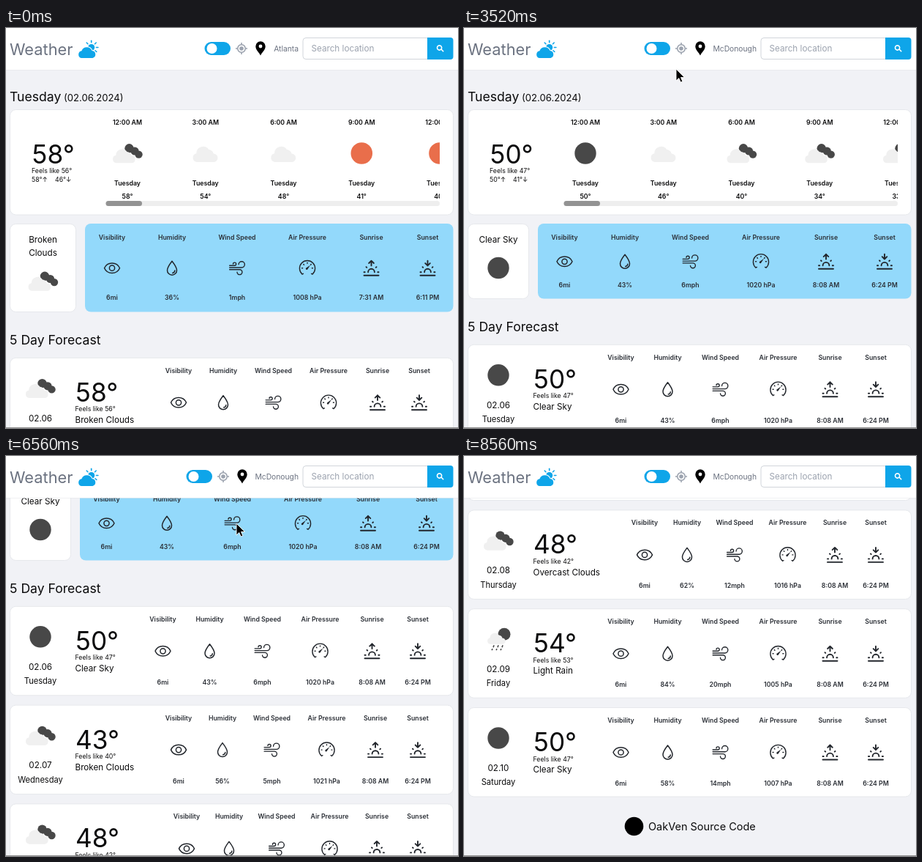
An HTML page for the animation above (8640 ms loop, 618 px wide and 546 px high).

```html
<!DOCTYPE html>
<html lang="en">
<head>
<meta charset="utf-8">
<title>Weather</title>
<style>
html, body { margin: 0; width: 100%; height: 100%; overflow: hidden; }
svg { display: block; font-family: Inter, sans-serif; }
svg {
  --bg: #f1f2f6; --head: #fff; --edge: #e6e8ec; --title: #6b7280; --ink: #0b0b0c;
  --card: #fff; --blue: #93d9fb; --brand: #0ea5e9; --button: #0ea5e9; --toggle: #0ea5e9;
  --pin: #000; --locate: #9ca3af; --city: #6b7280; --field: #fff; --fieldEdge: #d1d5db;
  --hint: #9ca3af; --track: #eeeeee; --thumb: #939393; --cloud: #f0f0f0;
}
svg.dark {
  --bg: #475569; --head: #263143; --edge: #263143; --title: #fff; --ink: #fff;
  --card: #9ca3af; --blue: #73b9dc; --button: #0284c7; --toggle: #1b232f;
  --pin: #fff; --locate: #cbd5e1; --city: #fff; --field: #9ca3af; --fieldEdge: #9ca3af;
  --hint: #6b7280; --track: #cdcdcd; --thumb: #4a4a4a; --cloud: #f4f4f4;
}
.line { fill: none; stroke: #22262c; stroke-linecap: round; stroke-linejoin: round; }
</style>
</head>
<body>
<svg id="stage" width="618" height="546" viewBox="0 0 618 546">
  <defs><clipPath id="hours"><rect x="130" y="112" width="463" height="143"/></clipPath></defs>
  <rect width="618" height="546" style="fill:var(--bg)"/>
  <g id="page"></g>
  <g id="header"></g>
  <rect y="545" width="618" height="1" fill="#929292"/>
  <g id="cursor"></g>
</svg>
<script>
const $ = id => document.getElementById(id);
const LOOP = 8640, STEP = 80;
const SMALL = 8.75, BODY = 11.7, LABEL = '#2b2f36';

const text = (x, y, s, size, { w = 400, a = 'start', fill = '#0b0b0c' } = {}) =>
  `<text x="${x}" y="${y}" font-size="${size}" font-weight="${w}" text-anchor="${a}" style="fill:${fill}">${s}</text>`;
const mid = (x, y, s, size, w = 400, fill) => text(x, y, s, size, { w, a: 'middle', fill });
const box = (x, y, w, h, r, fill, stroke = 'none') =>
  `<rect x="${x}" y="${y}" width="${w}" height="${h}" rx="${r}" style="fill:${fill};stroke:${stroke}"/>`;
const dot = (x, y, r, fill) => `<circle cx="${x}" cy="${y}" r="${r}" style="fill:${fill}"/>`;
const at = (x, y, s, k = 1) => `<g transform="translate(${x} ${y}) scale(${k})">${s}</g>`;
const line = (d, w = 1.5) => `<path class="line" d="${d}" stroke-width="${w}"/>`;
const card = (x, y, w, h, fill = 'var(--card)') =>
  box(x, y, w, h, 8, fill, fill === 'var(--card)' ? 'var(--edge)' : 'none');

// Sky pictures, centred on 0,0
const puff = fill => `<path d="M-12 12A6 6 0 0 1 -12.5 .2A9.3 9.3 0 0 1 4.5 -5A7.5 7.5 0 0 1 11 .5A5.8 5.8 0 0 1 12 12Z" style="fill:${fill}"/>`;
const GREY = '#484848';
const SKY = {
  night: dot(0, 0, 14.7, GREY),
  sun: dot(0, 0, 14.8, '#e96e4b'),
  cloud: puff('var(--cloud)'),
  broken: dot(2.5, -6.7, 6.2, GREY) + dot(10, -3, 5.6, GREY) + dot(15.5, 1.6, 5.2, GREY) +
    at(-4.5, 2.5, puff('var(--cloud)'), .9),
  rain: dot(8, -7, 8.5, GREY) + at(-2.5, -2, puff('var(--cloud)'), .72) +
    `<path d="M-6 8l-1 3M0 8l-1 3M6 8l-1 3M-8 13l-1 2M-2 13l-1 2M4 13l-1 2" stroke="${GREY}" stroke-width="1.6"/>`
};

// Detail icons, centred on 0,0
const dusk = head => line('M-10 10H10M-10 5.5H-8.8M8.8 5.5H10M-4.4 5.5A4.4 4.4 0 0 1 4.4 5.5M-7 -1.5L-6.3 -.8M7 -1.5L6.3 -.8M0 -10V-3.3' + head, 1.9);
const ticks = [180, 225, 270, 315, 360].map(d => {
  const c = Math.cos(d * Math.PI / 180), s = Math.sin(d * Math.PI / 180);
  return `M${c * 6.4} ${s * 6.4}L${c * 7.4} ${s * 7.4}`;
}).join('');
const DETAILS = [
  ['Visibility', line('M-10.5 0C-6.5 -9 6.5 -9 10.5 0C6.5 9 -6.5 9 -10.5 0Z') + '<circle class="line" r="3.6" stroke-width="1.5"/>'],
  ['Humidity', line('M0 -9.5C-3.5 -5 -6.5 -1 -6.5 3A6.5 6.5 0 0 0 6.5 3C6.5 -1 3.5 -5 0 -9.5ZM3.8 3.4A3.6 3.6 0 0 1 .7 6.7')],
  ['Wind Speed', `<g transform="scale(1.38) translate(-8 -8)">${
    line('M9.5 4.5A3 3 0 1 1 12.5 7.5H.5M4 4A1.5 1.5 0 1 1 5.5 5.5H.5M.5 9.5H10.5A2.5 2.5 0 1 1 8 12', 1)}</g>`],
  ['Air Pressure', line('M-5.6 7.6L-7 8.4A10.6 10.6 0 1 1 7 8.4L5.6 7.6' + ticks, 1.4) +
    '<path d="M-1.2 -.4L4 -4L.6 1.2A1.4 1.4 0 1 1 -1.2 -.4Z" fill="#22262c"/>'],
  ['Sunrise', dusk('M-3.3 -6.7L0 -10L3.3 -6.7')],
  ['Sunset', dusk('M-3.3 -6.6L0 -3.3L3.3 -6.6')]
];
const details = (cols, values, y, drop) => DETAILS.map(([name, icon], i) =>
  mid(cols[i], y, name, SMALL, 600, LABEL) + at(cols[i], y + drop, icon) +
  mid(cols[i], y + 2 * drop + 5, values[i], SMALL, 600, LABEL)).join('');

const NARROW = [214.5, 278.5, 350.5, 429.5, 500.5, 563];
const SUN_A = ['7:31 AM', '6:11 PM'], SUN_M = ['8:08 AM', '6:24 PM'];
const PLACES = {
  atlanta: {
    city: 'Atlanta', shift: 0, temp: 58, feels: 56, low: 46, sky: 'broken', label: ['Broken', 'Clouds'],
    hours: ['broken', 'cloud', 'cloud', 'sun', 'sun'], temps: [58, 54, 48, 41, 40],
    side: 91, gap: 108, tall: 120, cols: [145, 227, 316, 412, 499.5, 576.5],
    values: ['6mi', '36%', '1mph', '1008 hPa', ...SUN_A],
    days: [['broken', 58, 56, 'Broken Clouds', 'Tuesday', [236, 297, 365.5, 441, 508, 565], ['6mi', '36%', '1mph', '1008 hPa', ...SUN_A]]]
  },
  mcdonough: {
    city: 'McDonough', shift: -25, temp: 50, feels: 47, low: 41, sky: 'night', label: ['Clear Sky'],
    hours: ['night', 'cloud', 'broken', 'broken', 'broken'], temps: [50, 46, 40, 34, 33],
    side: 84, gap: 101, tall: 102, cols: [137.5, 220, 309.5, 406, 495, 575],
    values: ['6mi', '43%', '6mph', '1020 hPa', ...SUN_M],
    days: [
      ['night', 50, 47, 'Clear Sky', 'Tuesday', NARROW, ['6mi', '43%', '6mph', '1020 hPa', ...SUN_M]],
      ['broken', 43, 40, 'Broken Clouds', 'Wednesday', [236, 296, 363.5, 438.5, 505, 563], ['6mi', '56%', '5mph', '1021 hPa', ...SUN_M]],
      ['broken', 48, 42, 'Overcast Clouds', 'Thursday', [247, 305, 370, 442.5, 507, 563], ['6mi', '62%', '12mph', '1016 hPa', ...SUN_M]],
      ['rain', 54, 53, 'Light Rain', 'Friday', NARROW, ['6mi', '84%', '20mph', '1005 hPa', ...SUN_M]],
      ['night', 50, 47, 'Clear Sky', 'Saturday', NARROW, ['6mi', '58%', '14mph', '1007 hPa', ...SUN_M]]
    ]
  }
};
const TIMES = ['12:00 AM', '3:00 AM', '6:00 AM', '9:00 AM', '12:00 PM'];

const dayRow = ([sky, temp, feels, label, day, cols, values], i, y) =>
  card(5.5, y, 606, 121.5) +
  `<g class="sky">${at(47, y + 41.5, SKY[sky])}</g>` +
  mid(47, y + 86.3, '02.' + String(6 + i).padStart(2, '0'), BODY) +
  mid(47, y + 105.6, day, BODY * .95) +
  text(95, y + 59.5, temp + '°', 35.2) +
  text(94.5, y + 73, `Feels like ${feels}°`, SMALL) +
  text(94.5, y + 88.7, label, BODY) + details(cols, values, y + 20.5, 40.5);

function pageOf(p) {
  const hours = TIMES.map((time, i) => {
    const x = 166 + i * 106.75;
    return mid(x, 132, time, SMALL, 600) + `<g class="sky">${at(x, 171, SKY[p.hours[i]])}</g>` +
      mid(x, 215.3, 'Tuesday', SMALL, 600) + mid(x, 233.2, p.temps[i] + '°', SMALL, 600);
  }).join('');
  const cx = 5 + p.side / 2, base = 267 + p.tall;
  return text(5, 100, 'Tuesday', 17.6, { fill: 'var(--ink)' }) +
    text(79, 100, '(02.06.2024)', 13.1, { fill: 'var(--ink)' }) +
    card(5.5, 111.5, 606, 143.5) +
    text(35.5, 185, p.temp + '°', 35.2) +
    text(35, 198.3, `Feels like ${p.feels}°`, SMALL) +
    text(35, 210, p.temp + '°↑', SMALL) + text(67, 210, p.low + '°↓', SMALL) +
    `<g clip-path="url(#hours)">${hours}</g>` +
    box(136.5, 236, 456.5, 7, 3.5, 'var(--track)') + box(136.5, 236, 49.5, 7, 3.5, 'var(--thumb)') +
    card(5.5, 267.5, p.side - 1, p.tall) +
    p.label.map((s, i) => mid(cx, 293 + i * 18, s, BODY)).join('') +
    `<g class="sky">${at(cx, 309.5 + p.label.length * 18, SKY[p.sky])}</g>` +
    card(p.gap, 267, 611.5 - p.gap, p.tall + .5, 'var(--blue)') +
    details(p.cols, p.values, 289, p.label.length > 1 ? 38.7 : 29.8) +
    text(5, base + 45.3, '5 Day Forecast', 17.6, { fill: 'var(--ink)' }) +
    p.days.map((d, i) => dayRow(d, i, base + 63.3 + i * 134.8)).join('') +
    dot(232.5, 1133.5, 12.8, 'var(--pin)') +
    text(252, 1138.6, 'OakVen Source Code', 14.5, { fill: 'var(--ink)' });
}

const rays = [-135, -90, -45, 0, 40].map(d =>
  `<path d="M6.8 0H9.2" transform="rotate(${d})" style="stroke:var(--brand)" stroke-width="1.6" stroke-linecap="round"/>`).join('');

const headerOf = p =>
  box(0, -2, 618, 59, 0, 'var(--head)') + box(0, 57, 618, .6, 0, 'var(--edge)') +
  text(5, 36.5, 'Weather', 21.8, { fill: 'var(--title)' }) +
  at(116.7, 26.5, dot(0, 0, 4.5, 'var(--brand)') + rays) +
  `<path transform="translate(111 33)" d="M-8 8A5 5 0 0 1 -7.6 -1.8A7.6 7.6 0 0 1 6.6 -2A5.1 5.1 0 0 1 7.5 8Z" style="fill:var(--brand);stroke:var(--head);stroke-width:2;paint-order:stroke"/>` +
  at(p.shift, 0,
    box(271.5, 19, 35.5, 18, 9, 'var(--toggle)') + '<circle id="knob" cx="281.5" cy="28" r="7" fill="#fff"/>' +
    at(322, 28, dot(0, 0, 2.8, 'var(--locate)') +
      '<path d="M0 -5.3A5.3 5.3 0 1 1 -.01 -5.3ZM0 -8V-5M0 8V5M-8 0H-5M8 0H5" style="fill:none;stroke:var(--locate);stroke-width:1.6"/>') +
    at(348, 28, '<path d="M0 9.5C-2 5 -6.7 2 -6.7 -3A6.7 6.7 0 0 1 6.7 -3C6.7 2 2 5 0 9.5Z" style="fill:var(--pin)"/>' +
      dot(0, -3, 2.4, 'var(--head)'))) +
  text(400, 31.8, p.city, 10.3, { a: 'end', fill: 'var(--city)' }) +
  box(406, 13.5, 180, 29, 4, 'var(--field)', 'var(--fieldEdge)') +
  text(417.5, 32.2, 'Search location', BODY, { fill: 'var(--hint)' }) +
  '<path d="M576 13H607.5A4 4 0 0 1 611.5 17V39A4 4 0 0 1 607.5 43H576Z" style="fill:var(--button)"/>' +
  '<path d="M595.3 29.3L598.2 32.2M595.7 27A3.1 3.1 0 1 1 595.7 26.9Z" fill="none" stroke="#fff" stroke-width="1.6"/>';

const POINTERS = {
  arrow: '<path d="M0 0V16L3.8 12.5L6.2 18L8.8 16.9L6.5 11.5H11.5Z" fill="#000" stroke="#fff" stroke-width=".9"/>',
  hand: '<path d="M-1.7 1.6A1.6 1.6 0 0 1 1.5 1.6V7C1.5 5.6 4.2 5.6 4.2 7.3C4.5 6.1 6.7 6.3 6.7 7.9C7.1 6.9 9 7.2 9 8.7V13C9 16 8 16 7.5 18.5H.5C0 16.5 -2 15 -4.5 11C-5.5 9.4 -3.6 8.2 -2.3 9.6L-1.7 10.4Z" fill="#fff" stroke="#222" stroke-width="1"/>'
};
// time, x, y, pointer
const PATH = [
  [0, 450, 330, ''], [480, 450, 330, 'arrow'], [880, 322, 31, 'hand'], [1840, 322, 31, 'arrow'],
  [2080, 344, 63, 'arrow'], [3200, 344, 63, 'arrow'], [3520, 290, 56, 'arrow'], [3920, 290, 56, 'arrow'],
  [4160, 266, 22, 'hand'], [5840, 266, 22, 'arrow'], [6320, 315, 92, 'arrow'], [7440, 315, 92, 'arrow'],
  [8000, 335, 548, ''], [LOOP, 335, 548, '']
];

const clamp = v => Math.max(0, Math.min(1, v));
const pages = {}, headers = {};
for (const k in PLACES) { pages[k] = pageOf(PLACES[k]); headers[k] = headerOf(PLACES[k]); }
let shown = '', last = -1;

function draw(t) {
  const place = t < 2720 ? 'atlanta' : 'mcdonough';
  const dark = t >= 4320 && t < 5760;
  if (place !== shown) {
    $('page').innerHTML = pages[place];
    $('header').innerHTML = headers[place];
    shown = place;
  }
  $('stage').classList.toggle('dark', dark);
  const loading = t >= 2000 && t < 2720;
  for (const s of document.querySelectorAll('.sky')) s.style.display = loading ? 'none' : '';

  const slide = dark ? clamp((t - 4160) / 320) : t >= 5760 ? 1 - clamp((t - 5600) / 320) : 0;
  $('knob').setAttribute('cx', 281.5 + 15.5 * slide);

  // Wheel scroll that eases out to the end of the page
  const scroll = t < 6500 ? 0 : Math.round(628 * (1 - Math.exp((6500 - t) / 134)));
  $('page').setAttribute('transform', `translate(0 ${-scroll})`);

  const i = PATH.findIndex((p, n) => t >= p[0] && t < PATH[n + 1][0]);
  const [t0, x0, y0, kind] = PATH[i], [t1, x1, y1] = PATH[i + 1];
  const k = (t - t0) / (t1 - t0);
  $('cursor').innerHTML = kind && at(x0 + (x1 - x0) * k, y0 + (y1 - y0) * k, POINTERS[kind]);
}

const start = performance.now();
function tick() {
  const t = Math.floor((performance.now() - start) % LOOP / STEP) * STEP;
  if (t !== last) draw(last = t);
  requestAnimationFrame(tick);
}
tick();
</script>
</body>
</html>
```
